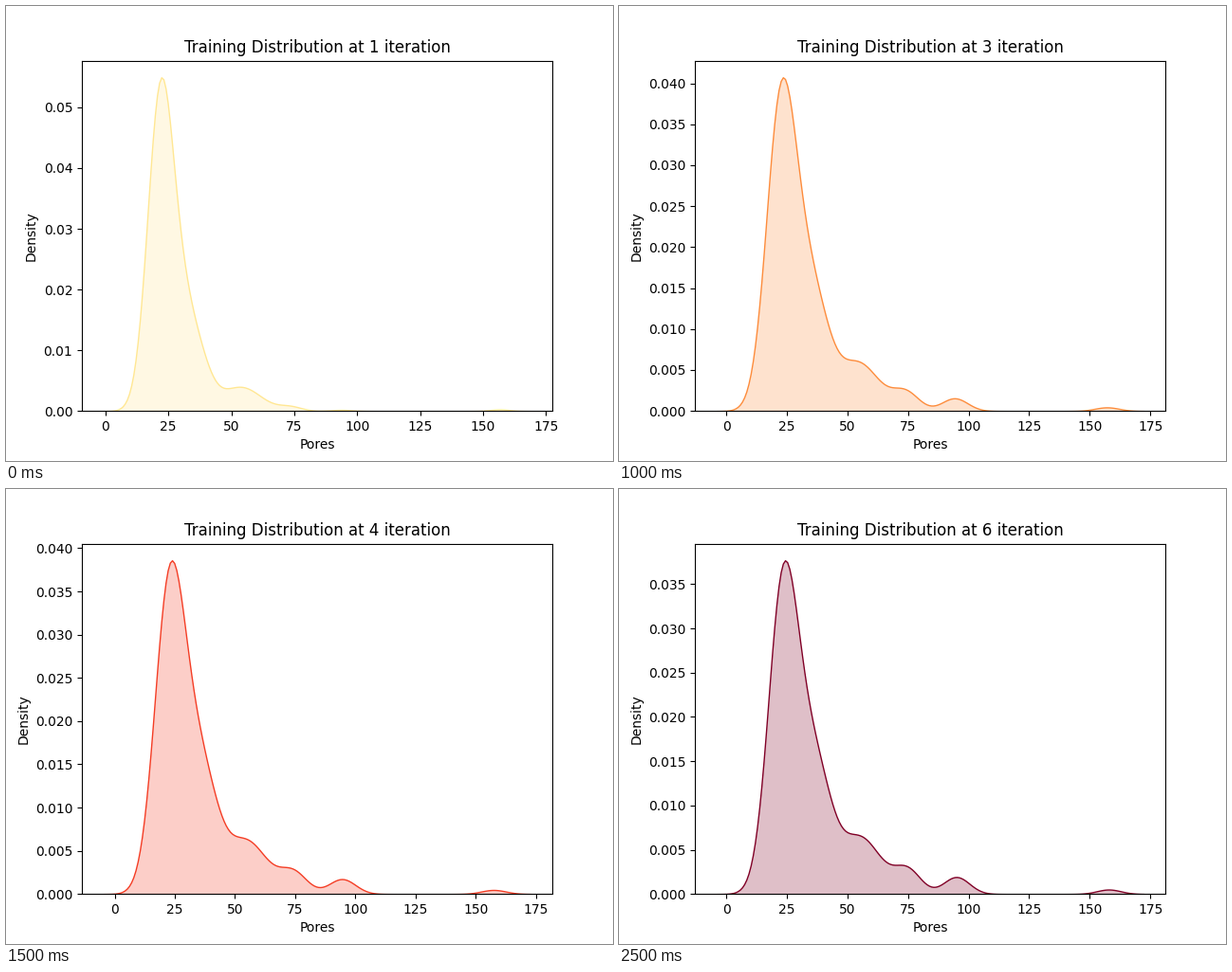
Animation, 640 px wide and 480 px high, one loop 3 s. Source, as a matplotlib script:

```python
import numpy as np
import matplotlib.pyplot as plt
from matplotlib.animation import FuncAnimation

STEPS = 6
CMAP = plt.get_cmap("YlOrRd")
LOW, HIGH = 10.65, 157.5  # smallest and largest sample

# Kernel bandwidth and peak density of each step
BANDWIDTH = (3.84, 4.91, 4.96, 5.12, 4.91, 4.96)
PEAK = (0.05495, 0.04432, 0.04073, 0.0386, 0.03919, 0.03769)

# Clusters of samples: centre, spread, first share, final share
CLUSTERS = (
    (21.7, 3.4, 0.650, 0.496),
    (30.9, 4.2, 0.210, 0.199),
    (38.3, 3.0, 0.046, 0.096),
    (53.7, 7.0, 0.079, 0.143),
    (73.3, 2.5, 0.008, 0.039),
    (93.7, 2.0, 0.002, 0.027),
    (156.6, 0.0, 0.0025, 0.0065),
)


def density(step, x):
    """Smoothed clusters whose tail shares settle as the steps go on."""
    settled = 1 - 0.5 ** step
    drift = 0.25 * step
    y = np.zeros_like(x)
    for centre, spread, first, final in CLUSTERS:
        width = np.hypot(spread, BANDWIDTH[step])
        share = first + (final - first) * settled
        y += share / width * np.exp(-0.5 * ((x - centre - drift) / width) ** 2)
    return y * PEAK[step] / y.max()


def draw(step):
    reach = 3 * BANDWIDTH[step]
    x = np.linspace(LOW - reach, HIGH + reach, 200)
    margin = 0.05 * (x[-1] - x[0])
    color = CMAP((step + 1) / STEPS)

    ax.clear()
    ax.fill_between(x, 0, density(step, x), linewidth=1,
                    facecolor=color[:3] + (0.25,), edgecolor=color)
    ax.set_xlim(x[0] - margin, x[-1] + margin)
    ax.set_ylim(0, 1.05 * PEAK[step])
    ax.set_xlabel("Pores")
    ax.set_ylabel("Density")
    ax.set_title(f"Training Distribution at {step + 1} iteration")
    return []


fig, ax = plt.subplots(figsize=(6.4, 4.8), dpi=100)
anim = FuncAnimation(fig, draw, frames=STEPS, interval=500, repeat=True,
                     init_func=lambda: draw(0))
plt.show()
```
